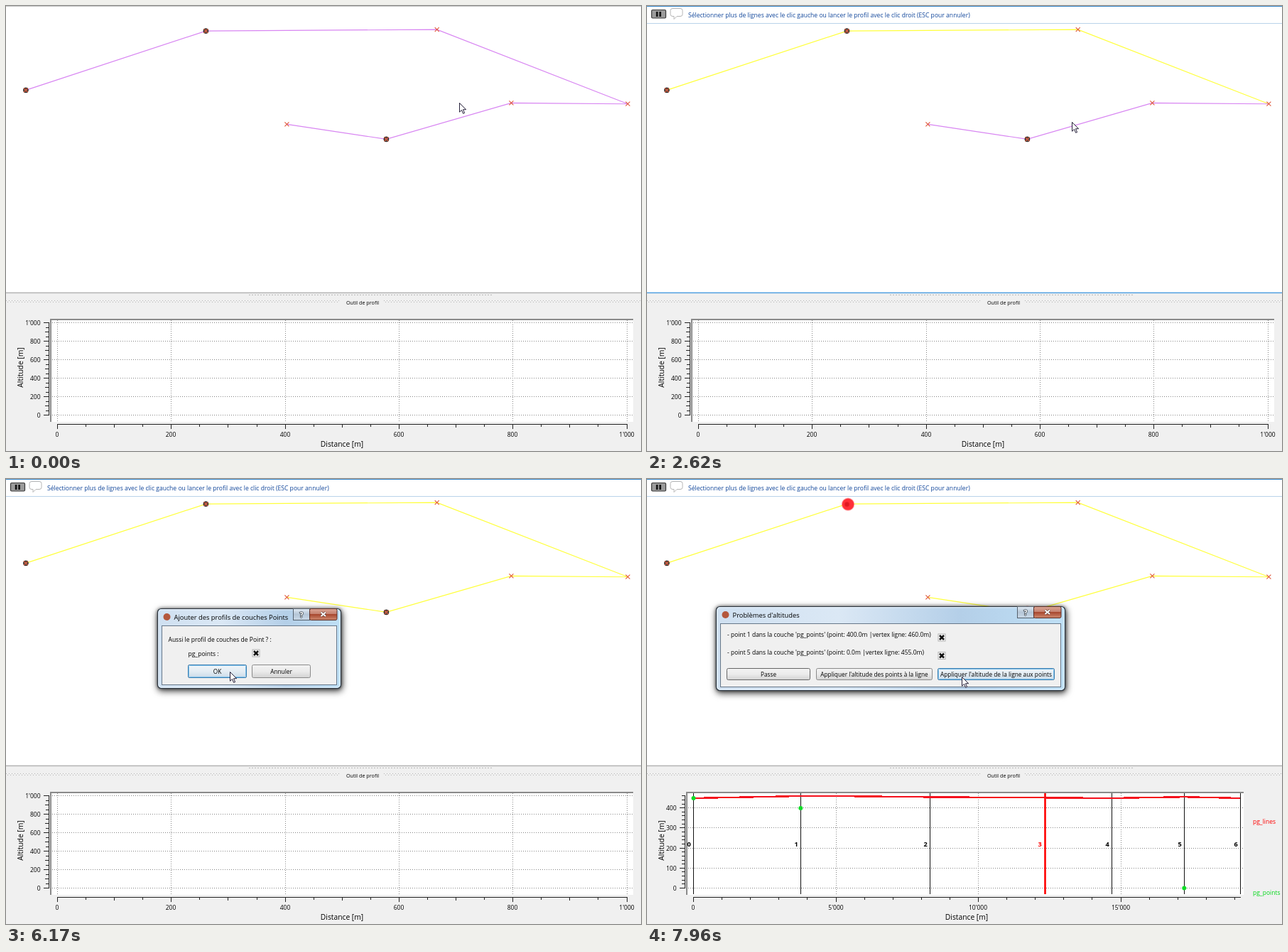
Recreate the animation shown at these times as an HTML page. Size 894 px wide and 626 px high, loop 8 s.

```html
<!DOCTYPE html>
<html lang="fr">
<head>
<meta charset="utf-8">
<title>Outil de profil</title>
<style>
html, body { margin: 0; width: 100%; height: 100%; overflow: hidden; background: #fff; }
svg { display: block; width: 894px; height: 626px; font: 8.5px "Open Sans", "Noto Sans", sans-serif; }
.crisp { shape-rendering: crispEdges; }
.anim { animation: 8s step-end -5ms infinite; }

.line1 { animation-name: line1; }
.line2 { animation-name: line2; }
.focusTop { animation-name: focusTop; }
.focusBottom { animation-name: focusBottom; }
.message { animation-name: message; }
.empty { animation-name: empty; }
.filled { animation-name: filled; }
.addDialog { animation-name: addDialog; transform-origin: 342.5px 238.5px; }
.altDialog { animation-name: altDialog; transform-origin: 343.5px 239px; }
.hoverOk { animation-name: hoverOk; }
.hoverPoints { animation-name: hoverPoints; }
.hoverLine { animation-name: hoverLine; }
.cursor { animation-name: cursor; }
.addDialog, .altDialog { filter: drop-shadow(0 0 2px rgba(0,0,0,.5)) drop-shadow(1px 3px 5px rgba(0,0,0,.75)); }

@keyframes line1 { 0% { stroke: #d886f2 } 16.25%, 100% { stroke: #ffff3c } }
@keyframes line2 { 0% { stroke: #d886f2 } 35.625%, 100% { stroke: #ffff3c } }
@keyframes focusTop { 0% { fill: #c6c6c6 } 20%, 100% { fill: #3787c8 } }
@keyframes focusBottom { 0% { fill: #b4b4b4 } 20% { fill: #4f9fe0 } 58.75%, 100% { fill: #b4b4b4 } }
@keyframes message { 0% { opacity: 0 } 21.25%, 100% { opacity: 1 } }
@keyframes empty { 0% { opacity: 1 } 82.925%, 100% { opacity: 0 } }
@keyframes filled { 0% { opacity: 0 } 82.925%, 100% { opacity: 1 } }
@keyframes hoverOk { 0% { opacity: 0 } 76.2%, 100% { opacity: 1 } }
@keyframes hoverPoints { 0% { opacity: 1 } 97.6%, 100% { opacity: 0 } }
@keyframes hoverLine { 0% { opacity: 0 } 98.4%, 100% { opacity: 1 } }
@keyframes addDialog {
  0% { opacity: 0; transform: scale(.92) }
  58.75% { opacity: .3; transform: scale(.93) }
  59.75% { opacity: .65; transform: scale(.955) }
  60.75% { opacity: .9; transform: scale(.974) }
  61.75% { opacity: 1; transform: none }
  81.875% { opacity: .5; transform: scale(.96) }
  82.925%, 100% { opacity: 0; transform: scale(.92) }
}
@keyframes altDialog {
  0% { opacity: 0; transform: scale(.92) }
  83.975% { opacity: .3; transform: scale(.94) }
  85.025% { opacity: .65; transform: scale(.965) }
  86.075% { opacity: .92; transform: scale(.983) }
  87.125%, 100% { opacity: 1; transform: none }
}
@keyframes cursor {
  0% { transform: translate(638px,136px) }
  1% { transform: translate(638px,136px); animation-timing-function: steps(2,start) }
  2.75% { transform: translate(567px,76px) }
  6.625% { transform: translate(567px,76px); animation-timing-function: steps(3,start) }
  9.5125% { transform: translate(534px,67px); animation-timing-function: steps(2,start) }
  11.4375% { transform: translate(491px,56px); animation-timing-function: steps(3,start) }
  14.325% { transform: translate(458px,48px) }
  25.75% { transform: translate(458px,48px); animation-timing-function: steps(3,start) }
  28.7125% { transform: translate(500px,83px); animation-timing-function: steps(3,start) }
  31.675% { transform: translate(575px,145px); animation-timing-function: steps(2,start) }
  33.65% { transform: translate(598px,163px); animation-timing-function: steps(2,start) }
  35.625% { transform: translate(603px,170px) }
  45.125% { transform: translate(603px,170px); animation-timing-function: steps(5,start) }
  50.28% { transform: translate(615px,191px) }
  65.75% { transform: translate(615px,191px); animation-timing-function: steps(3,start) }
  68.5625% { transform: translate(604px,186px) }
  71.5% { transform: translate(604px,186px); animation-timing-function: steps(2,start) }
  73.375% { transform: translate(530px,208px); animation-timing-function: steps(3,start) }
  76.1875% { transform: translate(370px,258px); animation-timing-function: steps(2,start) }
  78.0625% { transform: translate(315px,271px) }
  89% { transform: translate(315px,270px) }
  92.875% { transform: translate(315px,270px); animation-timing-function: steps(2,start) }
  94.767% { transform: translate(335px,271px); animation-timing-function: steps(3,start) }
  97.605% { transform: translate(400px,275px); animation-timing-function: steps(3,start) }
  100% { transform: translate(443px,278px) }
}
</style>
</head>
<body>
<svg id="stage" viewBox="0 0 894 626">
  <defs>
    <pattern id="dots" width="4" height="4" patternUnits="userSpaceOnUse" y="414">
      <path d="M0 0h1v1h-1zM2 2h1v1h-1z" fill="#b4b4b4"/>
    </pattern>
    <linearGradient id="glass">
      <stop offset="0" stop-color="#cfe0f1"/><stop offset=".35" stop-color="#dbe8f5"/>
      <stop offset=".7" stop-color="#b4cfe8"/><stop offset="1" stop-color="#bfe0f6"/>
    </linearGradient>
    <linearGradient id="close" x2="0" y2="1">
      <stop offset="0" stop-color="#dba595"/><stop offset=".48" stop-color="#c4806e"/>
      <stop offset=".5" stop-color="#a8482f"/><stop offset="1" stop-color="#cf8a70"/>
    </linearGradient>
    <linearGradient id="help" x2="0" y2="1">
      <stop offset="0" stop-color="#e2ebf4"/><stop offset=".5" stop-color="#b5c6d7"/><stop offset="1" stop-color="#cbdae8"/>
    </linearGradient>
    <linearGradient id="plain" x2="0" y2="1">
      <stop offset="0" stop-color="#f3f3f3"/><stop offset=".5" stop-color="#ebebeb"/><stop offset="1" stop-color="#d3d3d3"/>
    </linearGradient>
    <linearGradient id="hot" x2="0" y2="1">
      <stop offset="0" stop-color="#f0f5f9"/><stop offset=".5" stop-color="#e4edf4"/><stop offset="1" stop-color="#cbdbe8"/>
    </linearGradient>
  </defs>
  <rect width="894" height="626" fill="#fff"/>
  <g id="map" fill="none" transform="translate(.4 .4)"></g>
  <g class="anim message">
    <rect y="1" width="894" height="24" fill="#fff"/>
    <rect y="24" width="894" height="1" fill="#b9d3ea"/>
    <rect x="6.5" y="5.5" width="20" height="11.5" rx="1.5" fill="#9b9b9b" stroke="#383838" stroke-width="1.2"/>
    <path d="M12.8 8h2.6v7h-2.6zM17.3 8h2.6v7h-2.6z" fill="#111"/>
    <path d="M36 3.5h11q3 0 3 3v5q0 3-3 3h-5l-4 4v-4h-2q-3 0-3-3v-5q0-3 3-3z" fill="#fff" stroke="#b5b5b5"/>
    <text x="58" y="15.5" font-size="8.6" fill="#12479b">Sélectionner plus de lignes avec le clic gauche ou lancer le profil avec le clic droit (ESC pour annuler)</text>
  </g>
  <rect class="anim focusTop" width="894" height="1"/>
  <rect y="404" width="894" height="222" fill="#f0f0f0"/>
  <rect class="anim focusBottom" y="402.7" width="894" height="1.5"/>
  <path class="crisp" d="M342 406.5H684" stroke="#b8b8b8" stroke-dasharray="2 2"/>
  <path d="M0 414H470V418H0zM532 414H894V418H532z" fill="url(#dots)"/>
  <text x="479" y="420" font-size="7.2">Outil de profil</text>
  <g id="empty" class="anim empty"></g>
  <g id="filled" class="anim filled"></g>
  <g id="addDialog" class="anim addDialog"></g>
  <g id="altDialog" class="anim altDialog"></g>
  <path class="anim cursor" d="M.5 .5V13.2L3.5 10.4L5.6 15.3L7.6 14.5L5.5 9.7H9.6z" fill="#fff" stroke="#1b1630" stroke-width=".95"/>
</svg>
<script>
const byId = id => document.getElementById(id);

function add(parent, tag, attrs = {}, text) {
  const node = document.createElementNS('http://www.w3.org/2000/svg', tag);
  for (const key in attrs) node.setAttribute(key, attrs[key]);
  if (text !== undefined) node.textContent = text;
  return parent.appendChild(node);
}
const label = (parent, x, y, text, attrs) => add(parent, 'text', { x, y, ...attrs }, text);
const box = (parent, x, y, width, height, attrs) => add(parent, 'rect', { x, y, width, height, ...attrs });

// Map
const map = byId('map');
const upper = [[27.5, 118], [281, 34.7], [606.3, 32.7], [875, 137.3]];
const lower = [[395, 166], [535, 187], [711, 136], [875, 137.3]];
add(map, 'polyline', { points: upper.join(' '), class: 'anim line1', 'stroke-width': 1.15 });
add(map, 'polyline', { points: lower.join(' '), class: 'anim line2', 'stroke-width': 1.15 });
for (const [cx, cy] of [upper[0], upper[1], lower[1]])
  add(map, 'circle', { cx, cy, r: 3.4, fill: '#6a5348', stroke: '#1c1c1c' });
for (const [x, y] of [...upper, ...lower.slice(0, 3)])
  add(map, 'path', { d: `M${x - 3} ${y - 3}l6 6m0-6l-6 6`, stroke: '#e0573a', 'stroke-width': 1.1 });
const alerts = add(map, 'g', { class: 'anim filled' });
for (const [cx, cy] of [[282.6, 35.2], [535, 187]]) {
  add(alerts, 'circle', { cx, cy, r: 8.6, fill: '#ff3038' });
  add(alerts, 'circle', { cx: cx - 1.5, cy, r: 3.2, fill: '#e01a22' });
}

// Charts
const thousands = n => String(n).replace(/\B(?=000$)/, "'");

function chart(parent, { left, right, axis, x, y }) {
  const top = 441, bottom = 585, base = 588;
  const g = add(parent, 'g', { class: 'crisp', fill: 'none' });
  box(g, left, top, right - left, bottom - top, { fill: '#fff' });
  let grid = '', ticks = `M${axis + .5} ${y.end}V${y.start + 1}M${x.start} ${base + .5}H${x.end + 1}`;
  const length = (i, sub) => i % sub === 0 ? 7 : sub === 4 && i % 4 === 2 ? 5 : 4;

  for (let i = 0; ; i++) {
    const p = Math.round(x.start + i * x.size / x.sub);
    if (p > x.end) break;
    ticks += `M${p + .5} ${base}v${length(i, x.sub)}`;
    if (i % x.sub) continue;
    grid += `M${p + .5} ${top + 1}V${bottom}`;
    label(parent, p, 605.5, thousands(i / x.sub * x.step), { 'text-anchor': 'middle' });
  }
  for (let i = 0; ; i++) {
    const p = Math.round(y.start - i * y.size / y.sub);
    if (p < y.end) break;
    ticks += `M${axis} ${p + .5}h${-length(i, y.sub)}`;
    if (i % y.sub) continue;
    grid += `M${left + 1} ${p + .5}H${right}`;
    label(parent, axis - 11.5, p + 3.5, thousands(i / y.sub * y.step), { 'text-anchor': 'end' });
  }
  add(g, 'path', { d: grid, stroke: '#858585', 'stroke-dasharray': '1 2' });
  add(g, 'path', { d: ticks, stroke: '#222' });
  add(g, 'path', { d: `M${right} ${top}H${left - 1}V${bottom}`, stroke: '#8a8a8a', 'stroke-width': 2 });
  const title = { 'font-size': 10.3, 'text-anchor': 'middle' };
  label(parent, (x.start + x.end) / 2, 620, 'Distance [m]', title);
  label(parent, 0, 0, 'Altitude [m]', { ...title, transform: 'translate(24 508.5) rotate(-90)' });
}

chart(byId('empty'), {
  left: 64, right: 883, axis: 60,
  x: { start: 72, end: 874, size: 160.3, sub: 4, step: 200 },
  y: { start: 575, end: 445, size: 26, sub: 4, step: 200 }
});

const filled = byId('filled');
chart(filled, {
  left: 57, right: 840, axis: 53,
  x: { start: 65, end: 835, size: 200.5, sub: 5, step: 5000 },
  y: { start: 575, end: 445, size: 28.2, sub: 5, step: 100 }
});
[65, 216, 398, 560, 654, 756, 835].forEach((x, i) => {
  const red = i === 3;
  add(filled, 'path', { d: `M${x + .5} 442V584`, stroke: red ? '#f00' : '#111', 'stroke-width': red ? 2.6 : 1 });
  label(filled, x - (red ? 7 : 6), 516.5, i, {
    'text-anchor': 'middle', 'font-weight': 'bold', 'font-size': 9.2, fill: red ? '#f00' : '#000'
  });
});
add(filled, 'polyline', {
  points: '65,449 216,446 262,446 398,447.4 560,448.3 654,449 756,447.2 835,449',
  fill: 'none', stroke: '#f5101c', 'stroke-width': 2.4, class: 'crisp'
});
for (const [cx, cy] of [[65.5, 449], [216.3, 463], [756.3, 575.5]])
  add(filled, 'circle', { cx, cy, r: 3, fill: '#10dc28' });
label(filled, 853, 484.5, 'pg_lines', { fill: '#f00' });
label(filled, 853, 585, 'pg_points', { fill: '#00d818' });

// Dialogs
function dialog(g, x, y, w, h, title, client) {
  box(g, x + .5, y + .5, w - 1, h - 1, { rx: 5, fill: 'url(#glass)', stroke: '#2a333d', 'stroke-width': 1.2 });
  box(g, x + 1.8, y + 1.8, w - 3.6, h - 3.6, { rx: 4, fill: 'none', stroke: '#f1f9ff', 'stroke-opacity': .8 });
  box(g, x + 6.5, client + .5, w - 13, y + h - client - 6, { fill: '#f0f0f0', stroke: '#67788a' });
  const end = x + w - 6, help = end - 62;
  box(g, help + .5, y + .5, 23, 16, { fill: 'url(#help)', stroke: '#55616d' });
  box(g, help + 23.5, y + .5, 38.5, 16, { rx: 2, fill: 'url(#close)', stroke: '#5c3028' });
  label(g, help + 12, y + 12.5, '?', {
    'text-anchor': 'middle', 'font-size': 10.5, 'font-weight': 'bold', fill: '#fff',
    stroke: '#454f59', 'stroke-width': 1.6, 'paint-order': 'stroke'
  });
  const cross = `M${help + 39.5} ${y + 5.5}l6.5 5.5m0-5.5l-6.5 5.5`;
  add(g, 'path', { d: cross, stroke: '#5a3a35', 'stroke-width': 3.4 });
  add(g, 'path', { d: cross, stroke: '#fff', 'stroke-width': 2 });
  add(g, 'circle', { cx: x + 13.5, cy: y + 12, r: 5, fill: '#b4573c' });
  label(g, x + 23.5, y + 15.7, title, { 'font-size': 9.35 });
}

function button(g, x, y, w, h, text, { hover, border = '#8a8a8a' } = {}) {
  box(g, x + .5, y + .5, w - 1, h - 1, { rx: 2, fill: 'url(#plain)', stroke: border });
  if (hover) {
    const hot = add(g, 'g', { class: 'anim ' + hover });
    box(hot, x + .5, y + .5, w - 1, h - 1, { rx: 2, fill: 'url(#hot)', stroke: '#3c7fb1' });
    box(hot, x + 1.5, y + 1.5, w - 3, h - 3, { rx: 1, fill: 'none', stroke: '#7fc0ea' });
  }
  label(g, x + w / 2, y + h / 2 + 3.2, text, { 'text-anchor': 'middle', 'font-size': 8.3 });
}

function check(g, x, y) {
  box(g, x - 5, y - 5, 10, 10, { fill: '#f7f7f7', stroke: '#b4b4b4' });
  add(g, 'path', { d: `M${x - 3} ${y - 3}l6 6m0-6l-6 6`, stroke: '#111', 'stroke-width': 2.5 });
}

const adding = byId('addDialog');
dialog(adding, 213, 182, 259, 113, 'Ajouter des profils de couches Points', 206);
label(adding, 228.5, 228.5, 'Aussi le profil de couches de Point ? :');
label(adding, 256.5, 248.5, 'pg_points :');
check(adding, 352, 245);
button(adding, 256, 261, 83, 19, 'OK', { hover: 'hoverOk', border: '#666' });
button(adding, 346, 261, 83, 19, 'Annuler');

const altitudes = byId('altDialog');
dialog(altitudes, 97, 179, 492, 119, "Problèmes d'altitudes", 203);
label(altitudes, 113, 221.8, "- point 1 dans la couche 'pg_points' (point: 400.0m |vertex ligne: 460.0m)");
label(altitudes, 113, 247.2, "- point 5 dans la couche 'pg_points' (point: 0.0m |vertex ligne: 455.0m)");
check(altitudes, 415, 223);
check(altitudes, 415, 248.5);
button(altitudes, 112, 266, 118, 17, 'Passe', { border: '#666' });
button(altitudes, 238, 266, 164, 17, "Appliquer l'altitude des points à la ligne", { hover: 'hoverPoints' });
button(altitudes, 409, 266, 165, 17, "Appliquer l'altitude de la ligne aux points", { hover: 'hoverLine' });
</script>
</body>
</html>
```
